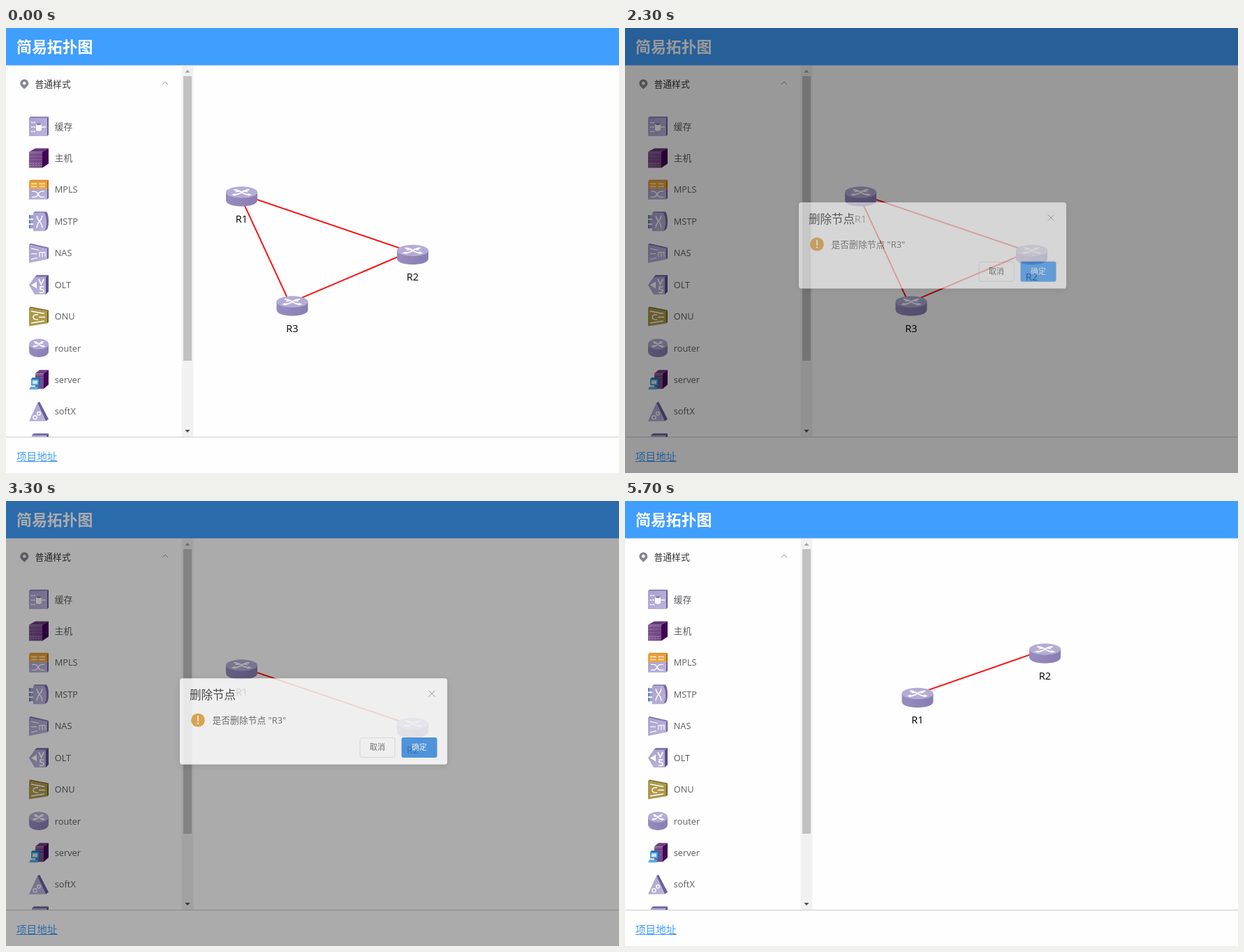
Animation, 878 px wide and 638 px high, one loop 6900 ms. Source, as an HTML page:

```html
<!DOCTYPE html>
<html lang="zh-CN">
<head>
<meta charset="utf-8">
<title>简易拓扑图</title>
<style>
  html, body { margin: 0; width: 100%; height: 100%; overflow: hidden; background: #fefefe; }
  svg { display: block; }
  text { font-family: "Open Sans", "Noto Sans CJK SC", "Noto Sans CJK", sans-serif; font-size: 12.8px; fill: #5c5e62; }
  .label { font-size: 14.6px; fill: #000; text-anchor: middle; }
  .blue { font-size: 14.6px; fill: #409eff; }
  .btn { font-size: 11px; text-anchor: middle; }
  .w { fill: none; stroke: #fff; stroke-width: 1.4; }
  .b { fill: none; stroke: #409eff; stroke-width: 1.1; stroke-linejoin: round; }
  #menu .panel { filter: drop-shadow(0 1px 2px rgba(0,0,0,.28)); }
  #dialog .panel { filter: drop-shadow(0 2px 5px rgba(0,0,0,.12)); }
</style>
</head>
<body>
<svg width="878" height="638" viewBox="0 0 878 638">
  <defs>
    <linearGradient id="side" x2="1"><stop stop-color="#978cbf"/><stop offset=".5" stop-color="#9085b9"/><stop offset="1" stop-color="#897eb3"/></linearGradient>
    <linearGradient id="lilac" x2="1" y2="1"><stop stop-color="#a9a0cf"/><stop offset="1" stop-color="#bdb5dc"/></linearGradient>
    <linearGradient id="plum" x2="1" y2="1"><stop stop-color="#8d659e"/><stop offset="1" stop-color="#70437f"/></linearGradient>
    <clipPath id="listClip"><rect y="54" width="251" height="532"/></clipPath>

    <g id="router">
      <path d="M-22.500-6V5.500C-22.500 11-12 14.200 0 14.200S22.500 11 22.500 5.500V-6Z" fill="url(#side)"/>
      <ellipse cy="-6" rx="22.500" ry="8.200" fill="#b4acd6"/>
      <path class="w" style="stroke-width:1.9" d="M-11-9.500Q-5-9.500 0-6T11-2.500M11-9.500Q5-9.500 0-6T-11-2.500"/>
      <path fill="#fff" d="M-3.500-6.500l-6 .2 3.500-3.600ZM3.500-6.500l6 .2-3.500-3.600ZM-15-2.200l5-2.400 1.400 3.800ZM15-2.200l-5-2.400-1.400 3.800Z"/>
    </g>

    <g id="cache">
      <path d="M0 2L2 0H28L26 2Z" fill="#8f86ba"/><path d="M26 2L28 0V26L26 28Z" fill="#6a5f9b"/>
      <path d="M0 2H26V28H0Z" fill="url(#lilac)"/>
      <path class="w" d="M3 8.500H9M3 15H9M3 21.500H9" stroke-dasharray="2.500 1"/>
      <path class="w" d="M18 15H24"/>
      <path d="M10 10.500V19.500Q14 22 18 19.500V10.500Z" fill="#fff"/><ellipse cx="14" cy="10.800" rx="3.600" ry="1.400" fill="#8379b0"/>
    </g>
    <g id="host">
      <path d="M0 5L9 0H28L19 5Z" fill="#66387a"/><path d="M19 5L28 0V22L19 28Z" fill="#420457"/>
      <path d="M0 5H19V28H0Z" fill="url(#plum)"/>
      <path d="M0 9.500H19M0 14H19M0 18.500H19" stroke="#63347a" stroke-width=".8" fill="none"/>
      <path d="M1 22H18M1 25H18" stroke="#a98bb7" stroke-dasharray="2.500 1.500" fill="none"/>
    </g>
    <g id="mpls">
      <path d="M0 2L2 0H28L26 2Z" fill="#d0851c"/><path d="M26 2L28 0V13H26Z" fill="#b77014"/>
      <path d="M0 2H26V13H0Z" fill="#eb9f32"/><path d="M26 13H28V26L26 28Z" fill="#6a5f9b"/>
      <path d="M0 13H26V28H0Z" fill="url(#lilac)"/>
      <path d="M3 5.500H11.500M14.500 5.500H23M3 9.500H11.500M14.500 9.500H23" stroke="#f9e4c2" stroke-width="1.800"/>
      <path class="w" d="M4 16.500H8Q11 16.500 13 20.500T18 24.500H22M4 24.500H8Q11 24.500 13 20.500T18 16.500H22"/>
    </g>
    <g id="mstp">
      <path d="M0 5H8V10H0ZM0 12H8V17H0ZM0 19H8V24H0Z" fill="#9aa0cb"/><path d="M0 5H2V10H0ZM0 12H2V17H0ZM0 19H2V24H0Z" fill="#6577aa"/>
      <path d="M6 2L8 0H25L23 2Z" fill="#8379b0"/><path d="M22 2L25 0Q28 4 28 14T25 26L22 28Z" fill="#7569a5"/>
      <path d="M6 2H22Q25 7 25 15T22 28H6Z" fill="url(#lilac)"/>
      <path class="w" d="M11 6Q12 11 15 14T19 23M19 6Q18 11 15 14T11 23"/>
    </g>
    <g id="nas">
      <path d="M0 2L2 0L28 6L26 8Z" fill="#8379b0"/><path d="M26 8L28 6V21L26 23Z" fill="#6a5f9b"/>
      <path d="M0 2L26 8V23L0 28Z" fill="url(#lilac)"/>
      <path class="w" d="M3 7.500L14 9.800M3 15H11M3 23L12 20.800M15 19.500V13H23V19M19 13V19.500" style="stroke-width:1.2"/>
    </g>
    <g id="olt">
      <path d="M8 3L11 0H28L24 3Z" fill="#8379b0"/><path d="M24 3L28 0V24L24 28Z" fill="#594e8c"/>
      <path d="M0 14.500L8 3H24V28H8Z" fill="url(#lilac)"/>
      <path d="M3 14.500L11 9.500V19.500Z" fill="#fff"/>
      <path class="w" style="stroke-width:1.7" d="M14 6L17.500 13.500L21 6M21 17H16V20.500Q21 20 21 23T15 25"/>
    </g>
    <g id="onu">
      <path d="M0 2L2 0L28 5L26 7Z" fill="#8a7734"/><path d="M26 7L28 5V22L26 24Z" fill="#756326"/>
      <path d="M0 2L26 7V24L0 28Z" fill="#ad994a"/>
      <path class="w" d="M3 6.500L22 10M3 23.500L22 20.500M23 15H14M13 11.500Q6 11 6 15T13 18.500"/>
    </g>
    <g id="server">
      <path d="M9 5L15 0H28L21 5Z" fill="#6b3f80"/><path d="M21 5L28 0V21L21 27Z" fill="#43055a"/>
      <path d="M9 5H21V27H9Z" fill="url(#plum)"/><path d="M9 9H21M9 13H21" stroke="#63347a"/>
      <path d="M3 13L5 11H16V20L14 22H3Z" fill="#1f68a8"/><path d="M3 13H14V22H3Z" fill="#4a9bd6"/>
      <path d="M5 15H12V20H5Z" fill="#cfe8f8"/><path d="M2 24H14L12 28H0Z" fill="#5aa9de"/><path d="M14 24L17 22L15 26L12 28Z" fill="#1f68a8"/>
    </g>
    <g id="softx">
      <path d="M12 2L15 0L28 25L24 28Z" fill="#6a5f9b"/><path d="M12 2L24 28H0Z" fill="url(#lilac)"/>
      <circle class="w" cx="8.500" cy="22.500" r="2.600"/><circle class="w" cx="14" cy="17" r="2.300"/>
    </g>
    <g id="block">
      <path d="M4 3L7 0H28L25 3Z" fill="#7067a3"/><path d="M4 3H25V28H4Z" fill="url(#lilac)"/>
      <path d="M25 3L28 0V28H25Z" fill="#594e8c"/>
    </g>
  </defs>

  <rect width="878" height="638" fill="#fefefe"/>
  <rect width="878" height="53.500" fill="#409eff"/>
  <text x="15" y="35" style="font-size:21.9px;font-weight:700;fill:#fff">简易拓扑图</text>

  <path d="M26.300 73.500a6 6 0 0 0-6 6c0 3.500 4 6 6 8c2-2 6-4.500 6-8a6 6 0 0 0-6-6Z" fill="#85888e"/>
  <circle cx="26.300" cy="79.200" r="2.300" fill="#fff"/>
  <text x="41.500" y="84.600" style="fill:#303133">普通样式</text>
  <path d="M224 81L228 77L232 81" fill="none" stroke="#909399"/>
  <g id="list" clip-path="url(#listClip)"></g>

  <rect x="251.500" y="54" width="17" height="532" fill="#f1f1f1"/>
  <rect x="254" y="69" width="12" height="408" fill="#c1c1c1"/>
  <path d="M256.500 64L260 60L263.500 64Z" fill="#a3a3a3"/>
  <path d="M256.500 576L260 580L263.500 576Z" fill="#505050"/>

  <path d="M0 586.500H878" stroke="#ccc"/>
  <text class="blue" x="15" y="620">项目地址</text>
  <path d="M15 621.500H74" stroke="#409eff"/>

  <g id="links" stroke="#ff0808" stroke-width="1.900"></g>
  <g id="nodes"></g>

  <g id="menu">
    <rect class="panel" x="394" y="395" width="118" height="112" fill="#fff"/>
    <rect id="hover" x="394" width="118" height="37.300" fill="#d9ecff"/>
    <path class="b" d="M423.500 411L416 414.500L423.500 418"/>
    <g fill="#409eff"><circle cx="416" cy="414.500" r="2.200"/><circle cx="423.500" cy="411" r="2"/><circle cx="423.500" cy="418.200" r="2"/></g>
    <path class="b" d="M415.500 454L421.500 446L424.500 448.200L418.500 456L415 457.300ZM420 448L423 450.300M414 458.500H425.500"/>
    <path class="b" d="M413.500 485H425.500M417 485V482.700H422V485M415 485V495H424V485M418 487.500V492.500M421 487.500V492.500"/>
    <text class="blue" x="435.500" y="420">连接</text>
    <text class="blue" x="435.500" y="457.300">重命名</text>
    <text class="blue" x="435.500" y="494.500">删除节点</text>
  </g>

  <rect id="mask" width="878" height="638"/>

  <g id="dialog">
    <rect class="panel" x="249" y="258" width="383" height="123.500" rx="3.600" fill="#fff"/>
    <text x="263" y="287.500" style="font-size:16.5px;fill:#303133">删除节点</text>
    <path d="M605.500 275.500L614.500 284.500M614.500 275.500L605.500 284.500" stroke="#909399"/>
    <circle cx="275" cy="318" r="9.800" fill="#e6a23c"/>
    <path d="M275 312.500V319" stroke="#fff" stroke-width="1.800" stroke-linecap="round"/><circle cx="275" cy="322.500" r="1.200" fill="#fff"/>
    <text x="295.500" y="322.600">是否删除节点 "R3"</text>
    <rect x="507" y="343.300" width="50" height="28" rx="2.500" fill="#fff" stroke="#dcdfe6"/>
    <text class="btn" x="532" y="361">取消</text>
    <rect id="ok" x="566.500" y="342.800" width="51" height="29" rx="2.700"/>
    <text class="btn" x="592" y="361" style="fill:#fff;font-weight:500">确定</text>
  </g>
</svg>

<script>
const LOOP = 6900;
const $ = id => document.getElementById(id);
const place = (el, x, y) => el.setAttribute('transform', `translate(${x} ${y})`);
const show = (el, on) => el.setAttribute('visibility', on ? 'visible' : 'hidden');

// Sidebar
const items = [['cache', '缓存'], ['host', '主机'], ['mpls', 'MPLS'], ['mstp', 'MSTP'], ['nas', 'NAS'],
  ['olt', 'OLT'], ['onu', 'ONU'], ['router', 'router'], ['server', 'server'], ['softx', 'softX'], ['block', '']];
$('list').innerHTML = items.map(([icon, name], i) => {
  const y = 141 + i * 45.42;
  const pos = icon === 'router'
    ? `translate(47 ${y - 0.2}) scale(.62 .93)`
    : `translate(33 ${y - 14})`;
  return `<use href="#${icon}" transform="${pos}"/><text x="69.700" y="${y + 4.6}">${name}</text>`;
}).join('');

// Graph
const names = ['R1', 'R2', 'R3'];
const pairs = [[0, 1], [0, 2], [1, 2]];
$('links').innerHTML = pairs.map(() => '<line/>').join('');
$('nodes').innerHTML = names.map(n =>
  `<g><use href="#router"/><text class="label" y="37">${n}</text></g>`).join('');
const lines = [...$('links').children];
const nodes = [...$('nodes').children];

// Each step overrides part of the state before it
const steps = [
  [0, { R1: [337.5, 241.5], R2: [582.5, 325], R3: [410, 398.5], row: -1, mask: 0, dialog: 0, ok: '#409eff' }],
  [1100, { row: 0 }],
  [1600, { row: 2 }],
  [2300, { row: -1, mask: 0.4, dialog: 0.6 }],
  [2400, { mask: 0.5, dialog: 0.9, ok: '#66b1ff' }],
  [2500, { dialog: 1 }],
  [3200, { ok: '#3a8ee6' }],
  [3300, { R3: null, mask: 0.33, dialog: 0.81 }],
  [3400, { mask: 0.02, dialog: 0.24 }],
  [3500, { mask: 0, dialog: 0.03 }],
  [3600, { dialog: 0 }],
  [4600, { R2: [580.5, 317] }],
  [4700, { R2: [594, 283] }],
  [4800, { R2: [602, 249] }],
  [4900, { R2: [601.5, 218.5] }],
  [5500, { R1: [362, 253] }],
  [5600, { R1: [396, 270] }],
  [5700, { R1: [419, 282] }]
];

function draw(t) {
  const s = Object.assign({}, ...steps.filter(([at]) => at <= t).map(step => step[1]));
  const at = names.map(n => s[n]);

  nodes.forEach((el, i) => {
    show(el, at[i]);
    if (at[i]) place(el, ...at[i]);
  });
  pairs.forEach(([a, b], i) => {
    const p = at[a], q = at[b], el = lines[i];
    show(el, p && q);
    if (!p || !q) return;
    const ends = { x1: p[0] - 3.7, y1: p[1] - 4.3, x2: q[0] - 3.7, y2: q[1] - 4.3 };
    for (const k in ends) el.setAttribute(k, ends[k]);
  });

  show($('menu'), s.row >= 0);
  $('hover').setAttribute('y', 395 + Math.max(s.row, 0) * 37.35);
  $('mask').setAttribute('opacity', s.mask);
  show($('dialog'), s.dialog > 0);
  $('dialog').setAttribute('opacity', s.dialog);
  place($('dialog'), 0, -20 * (1 - s.dialog));
  $('ok').setAttribute('fill', s.ok);
}

const start = performance.now();
function tick() {
  draw((performance.now() - start) % LOOP);
  requestAnimationFrame(tick);
}
tick();
</script>
</body>
</html>
```
